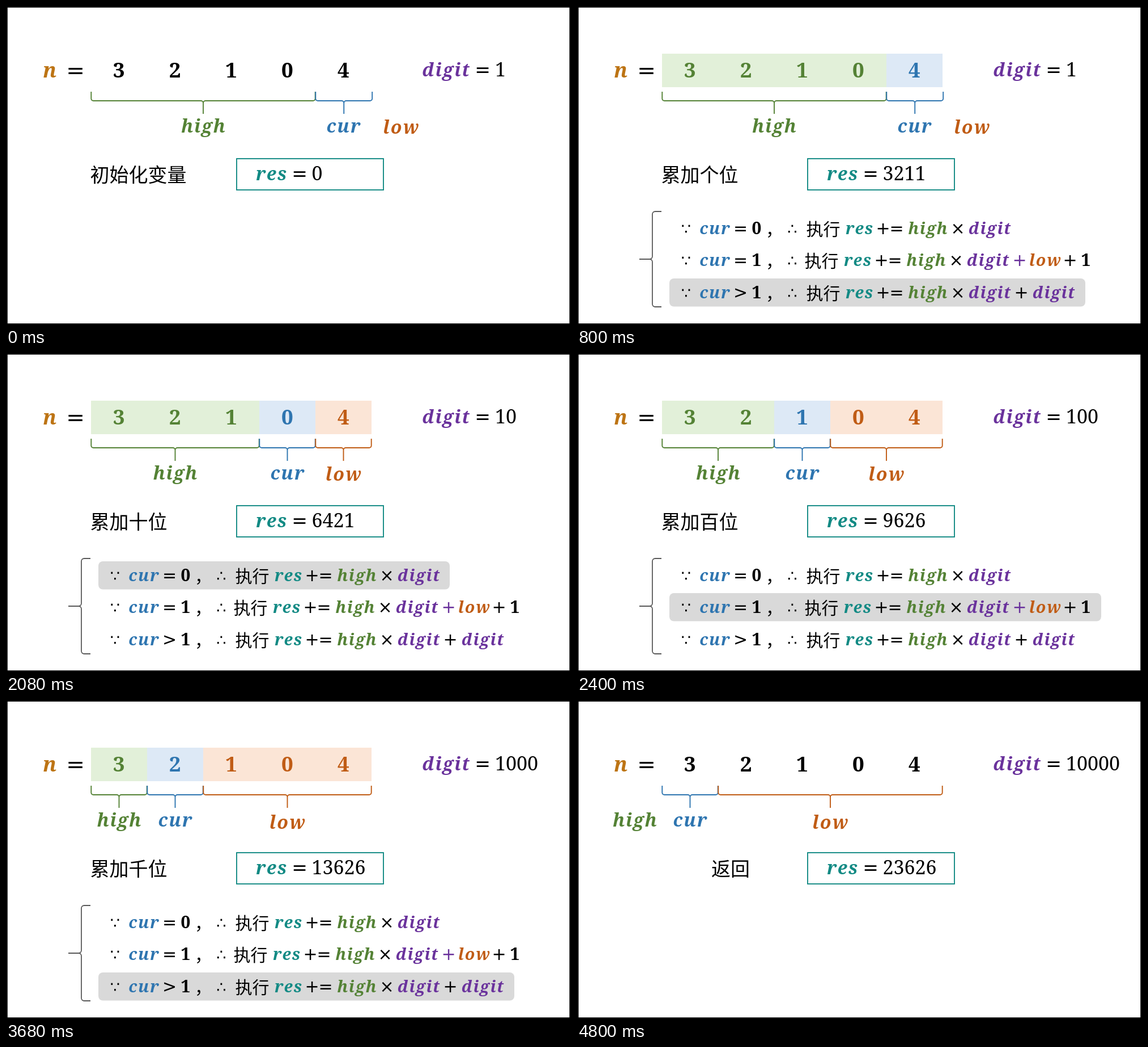
These frames come from a looping animation (997x562 px, 5.6 s). An HTML page with a canvas:

```html
<!DOCTYPE html>
<html lang="zh-CN">
<head>
<meta charset="utf-8">
<title>Counting the digit one</title>
<style>
html, body { margin: 0; width: 100%; height: 100%; overflow: hidden; background: #fff; }
canvas { display: block; }
</style>
</head>
<body>
<canvas id="stage" width="997" height="562"></canvas>
<script>
const ctx = document.getElementById('stage').getContext('2d');
const STEP = 800;
const BLACK = '#000', GREEN = '#548235', BLUE = '#2e75b0', ORANGE = '#c05c15',
      PURPLE = '#6a329c', TEAL = '#128a84', GOLD = '#bd7414';
const wordColor = { n: GOLD, high: GREEN, cur: BLUE, low: ORANGE, digit: PURPLE, res: TEAL };
const cellFill = { high: '#e2f0d9', cur: '#dde9f6', low: '#fbe5d6' };
const number = '32104';

// cur: index of the current digit; row: the rule that applies (-1 hides the rules)
const steps = [
  { cur: 4, row: -1, title: '初始化变量', res: 0 },
  { cur: 4, row: 2, title: '累加个位', res: 3211 },
  { cur: 3, row: 0, title: '累加十位', res: 6421 },
  { cur: 2, row: 1, title: '累加百位', res: 9626 },
  { cur: 1, row: 2, title: '累加千位', res: 13626 },
  { cur: 0, row: 2, title: '累加万位', res: 23626 },
  { cur: 0, row: -1, title: '返回', res: 23626 },
];

const rules = [
  { y: 402, width: 620, shift: 0, test: '=', value: '0', tail: [] },
  { y: 458, width: 762, shift: -3, test: '=', value: '1',
    tail: [['+', 781, PURPLE], ['low', 826], ['+', 870], ['1', 898]] },
  { y: 515, width: 734, shift: 0, test: '>', value: '1',
    tail: [['+', 784], ['digit', 841]] },
];

function text(str, x, y, font, color = BLACK, align = 'center') {
  ctx.font = font;
  ctx.fillStyle = color;
  ctx.textAlign = align;
  ctx.fillText(str, x, y);
}

const serif = (size, style = '') => `${style} ${size}px "Noto Serif", serif`;
const symbol = (str, x, y, size, color) => text(str, x, y, `${size}px "DejaVu Sans", sans-serif`, color);
const chinese = (str, x, y, size) =>
  text(str, x, y, `300 ${size}px "Noto Sans CJK SC", "Noto Sans CJK", sans-serif`, BLACK, 'left');

// Math-style word with loosely set letters
function word(str, x, y, size = 32) {
  const spacing = size * 0.06;
  ctx.letterSpacing = spacing + 'px';
  text(str, x + spacing / 2, y, serif(size, 'italic bold'), wordColor[str]);
  ctx.letterSpacing = '0px';
}

function brace(x0, x1, color) {
  const mid = (x0 + x1) / 2, y = 167, r = 4;
  ctx.beginPath();
  ctx.moveTo(x0, 151);
  ctx.arcTo(x0, y, x0 + r, y, r);
  ctx.arcTo(mid, y, mid, y + r, r);
  ctx.lineTo(mid, 190);
  ctx.lineTo(mid, y + r);
  ctx.arcTo(mid, y, mid + r, y, r);
  ctx.arcTo(x1, y, x1, y - r, r);
  ctx.lineTo(x1, 151);
  ctx.strokeStyle = color;
  ctx.lineWidth = 1.9;
  ctx.stroke();
}

function drawNumber({ cur, row }) {
  const cellX = i => 150 + 99 * i;
  const groups = [['high', 0, cur], ['cur', cur, cur + 1], ['low', cur + 1, 5]];
  word('n', 77, 126, 36);
  symbol('=', 122.5, 127, 39);

  for (const [name, from, to] of groups) {
    if (row >= 0) {
      ctx.fillStyle = cellFill[name];
      ctx.fillRect(cellX(from), 84, 99 * (to - from), 59);
    }
    for (let i = from; i < to; i++)
      text(number[i], cellX(i) + 49.3, 126, serif(37, 'bold'), row < 0 ? BLACK : wordColor[name]);
    let mid = cellX((from + to) / 2);
    if (from === to) mid += name === 'high' ? -48 : 52;
    word(name, mid, name !== 'low' ? 223 : cur < 2 ? 227 : 225);
  }
  for (const [name, from, to] of groups) {
    const spill = name === 'cur' && to === 5 ? 1.5 : 0;
    if (from < to) brace(cellX(from) + 0.3, cellX(to) - 0.3 + spill, wordColor[name]);
  }

  word('digit', 776, 124);
  symbol('=', 841, 124, 33);
  text(10 ** (4 - cur), 863, 124, serif(34), BLACK, 'left');
}

function drawResult({ title, res, row }) {
  chinese(title, title === '返回' ? 237 : 148.5, 310, 34);
  ctx.strokeStyle = TEAL;
  ctx.lineWidth = 1.9;
  ctx.strokeRect(407, 269, 259, 55);
  word('res', 468, 307);
  symbol('=', 518, 307, 33);
  text(res, 539.5, 307, serif(34), BLACK, 'left');
}

function drawToken([str, x, color], y) {
  if (wordColor[str]) word(str, x, y, 28.5);
  else if (/\d/.test(str)) text(str, x, y, serif(30, 'bold'));
  else symbol(str, x, y, 30, color);
}

function drawRules(active) {
  ctx.beginPath();
  ctx.moveTo(149, 362);
  ctx.arcTo(133, 362, 133, 368, 5);
  ctx.arcTo(133, 446, 127, 446, 5);
  ctx.lineTo(110, 446);
  ctx.lineTo(127, 446);
  ctx.arcTo(133, 446, 133, 452, 5);
  ctx.arcTo(133, 530, 149, 530, 5);
  ctx.lineTo(149, 530);
  ctx.strokeStyle = '#595959';
  ctx.lineWidth = 1.8;
  ctx.stroke();

  rules.forEach(({ y, width, shift, test, value, tail }, i) => {
    if (i === active) {
      ctx.beginPath();
      ctx.roundRect(163, y - 35, width, 49.5, 8);
      ctx.fillStyle = '#d9d9d9';
      ctx.fill();
    }
    symbol('∵', 192.5, y, 27);
    symbol('∴', 380, y, 27);
    chinese('，', 333, y + 1.5, 30);
    chinese('执行', 404.5 + shift, y + 1.5, 30);
    const action = [['res', 498], ['+', 540], ['=', 564], ['high', 619], ['×', 672], ['digit', 728]];
    [['cur', 243], [test, 288.5], [value, 317],
     ...action.map(([str, x]) => [str, x + shift]), ...tail].forEach(token => drawToken(token, y));
  });
}

function draw() {
  const step = steps[Math.floor(performance.now() / STEP) % steps.length];
  ctx.fillStyle = '#fff';
  ctx.fillRect(0, 0, 997, 562);
  drawNumber(step);
  drawResult(step);
  if (step.row >= 0) drawRules(step.row);
  ctx.strokeStyle = BLACK;
  ctx.lineWidth = 3;
  ctx.strokeRect(1.25, 1.25, 994.5, 559.5);
  requestAnimationFrame(draw);
}
draw();
</script>
</body>
</html>
```
